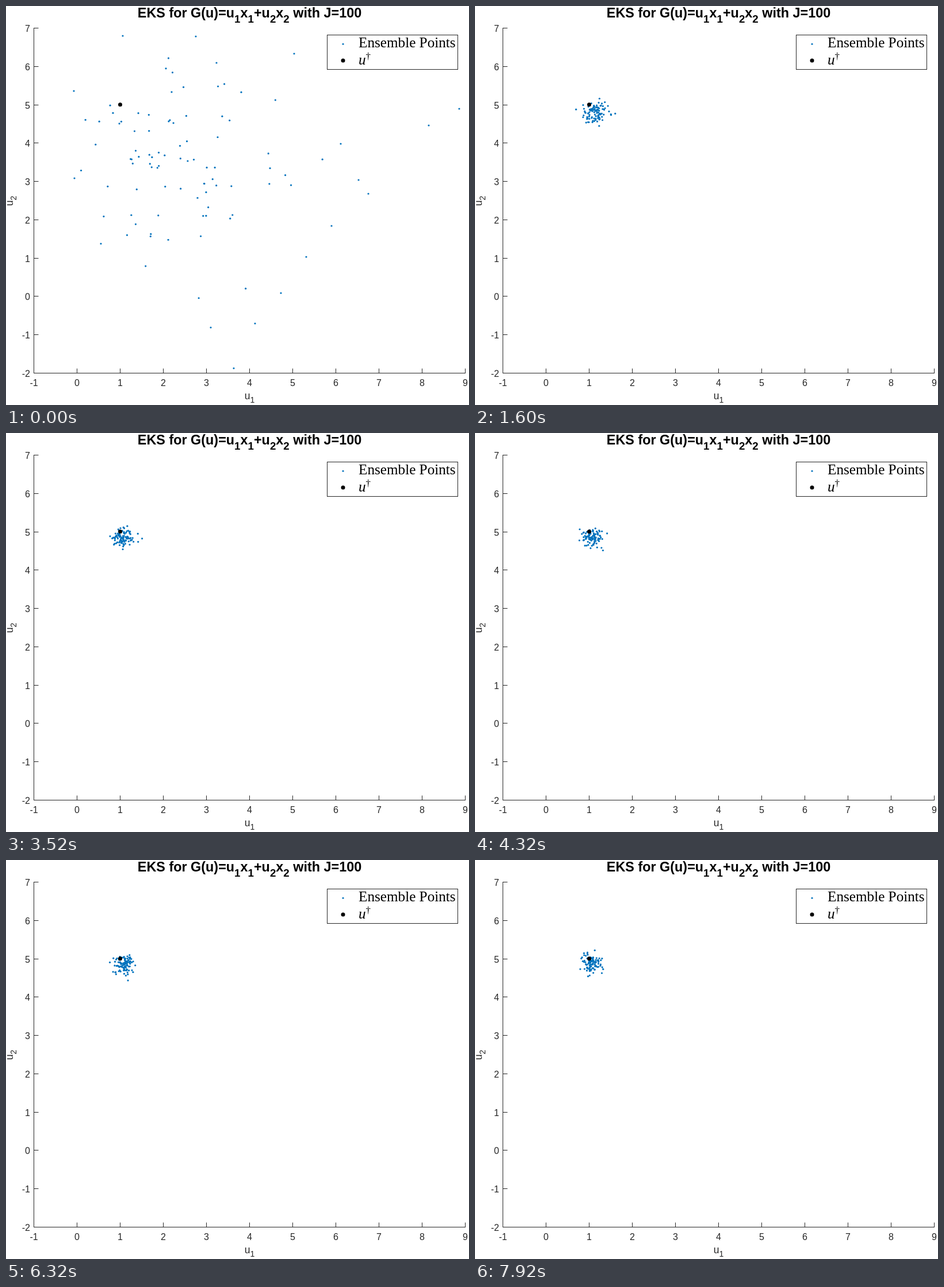
An HTML page for the animation above (8 s loop, 805 px wide and 695 px high).

```html
<!DOCTYPE html>
<html lang="en">
<head>
<meta charset="utf-8">
<title>EKS ensemble</title>
<style>
  html, body { margin: 0; width: 100%; height: 100%; overflow: hidden; background: #fff; }
  svg { display: block; width: 805px; height: 695px; font-family: "Liberation Sans", Arial, sans-serif; }
  .line { fill: none; stroke: #262626; stroke-width: 1; }
  .label { fill: #262626; font-size: 17.6px; text-anchor: middle; }
  .label .sub { font-size: 14.1px; }
  .title { font-size: 23.4px; font-weight: bold; text-anchor: middle; }
  .title .sub { font-size: 18.7px; }
  .tick { fill: #262626; font-size: 16px; }
  .legend { font-family: "Liberation Serif", Times, serif; font-size: 25.2px; }
  .dot { fill: #0072bd; }
</style>
</head>
<body>
<svg viewBox="0 0 805 695">
  <g id="axes"></g>
  <text class="title" x="423.5" y="20">EKS for G(u)=u<tspan class="sub" dy="9">1</tspan><tspan dy="-9">x</tspan><tspan class="sub" dy="9">1</tspan><tspan dy="-9">+u</tspan><tspan class="sub" dy="9">2</tspan><tspan dy="-9">x</tspan><tspan class="sub" dy="9">2</tspan><tspan dy="-9"> with J=100</tspan></text>
  <text class="label" x="423.5" y="685">u<tspan class="sub" dy="6">1</tspan></text>
  <text class="label" transform="translate(12 339.5) rotate(-90)">u<tspan class="sub" dy="6">2</tspan></text>
  <g id="cloud"></g>
  <circle cx="198.5" cy="171.8" r="3.5"/>
  <rect class="line" x="558.5" y="50.5" width="227" height="60"/>
  <circle class="dot" cx="586" cy="66.3" r="1.5"/>
  <circle cx="586" cy="95" r="3.5"/>
  <text class="legend" x="613" y="72">Ensemble Points</text>
  <text class="legend" x="613" y="101.5"><tspan font-style="italic">u</tspan><tspan font-size="17" dy="-8.5">†</tspan></text>
</svg>
<script>
const STEP_MS = 80, STEPS = 100, COUNT = 100;
const DECAY = 0.855;
const CENTER = [203.5, 181.3];
const SPREAD = [9.8, 8];

// Outermost starting positions; the rest of the cloud is random.
const RIM = [
  [788, 179], [735, 208], [630, 327], [613, 303], [582, 240], [566, 383],
  [501, 83], [366, 99], [330, 53], [203, 52], [118, 148], [119, 300],
  [165, 414], [356, 560], [396, 631], [433, 553], [478, 500], [522, 437]
];

function add(parent, name, attrs, text) {
  const el = document.createElementNS(parent.namespaceURI, name);
  for (const key in attrs) el.setAttribute(key, attrs[key]);
  if (text !== undefined) el.textContent = text;
  return parent.appendChild(el);
}

function seeded(seed) {
  return () => {
    seed = (seed + 0x6d2b79f5) | 0;
    let r = Math.imul(seed ^ (seed >>> 15), 1 | seed);
    r = (r + Math.imul(r ^ (r >>> 7), 61 | r)) ^ r;
    return ((r ^ (r >>> 14)) >>> 0) / 4294967296;
  };
}

const random = seeded(17);
const gauss = () =>
  Math.sqrt(-2 * Math.log(1 - random())) * Math.cos(2 * Math.PI * random());

function drawAxes() {
  const axes = document.getElementById("axes");
  const px = v => 48.5 + 75 * (v + 1);
  const py = v => 639.5 - 66.78 * (v + 2);
  add(axes, "path", { class: "line", d: "M48.5 38V639.5H799" });
  for (let v = -1; v <= 9; v++) {
    add(axes, "path", { class: "line", d: `M${px(v)} 639.5v-8` });
    add(axes, "text", { class: "tick", x: px(v), y: 661.5, "text-anchor": "middle" }, v);
  }
  for (let v = -2; v <= 7; v++) {
    const y = Math.floor(py(v)) + 0.5;
    add(axes, "path", { class: "line", d: `M48.5 ${y}h8` });
    add(axes, "text", { class: "tick", x: 42, y: y + 6, "text-anchor": "end" }, v);
  }
}

function scatter() {
  const points = RIM.slice();
  while (points.length < COUNT) {
    const x = 280 + 100 * gauss(), y = 275 + 95 * gauss();
    const inside = x > 118 && x < 560 && y > 52 && y < 560 && y < x + 250;
    if (inside) points.push([x, y]);
  }
  return points;
}

// Each point decays towards the centre while correlated noise builds up.
function advance(points) {
  const kick = Math.sqrt(1 - DECAY * DECAY);
  return points.map(p => p.map((v, axis) =>
    CENTER[axis] + DECAY * (v - CENTER[axis]) + kick * SPREAD[axis] * gauss()));
}

drawAxes();
const steps = [scatter()];
while (steps.length < STEPS) steps.push(advance(steps[steps.length - 1]));

const cloud = document.getElementById("cloud");
const dots = steps[0].map(() => add(cloud, "circle", { class: "dot", r: 1.6 }));
let shown = -1;

function render() {
  const now = Math.floor(performance.now() / STEP_MS) % STEPS;
  if (now !== shown) {
    shown = now;
    steps[now].forEach(([x, y], i) => {
      dots[i].setAttribute("cx", x.toFixed(2));
      dots[i].setAttribute("cy", y.toFixed(2));
    });
  }
  requestAnimationFrame(render);
}
render();
</script>
</body>
</html>
```
